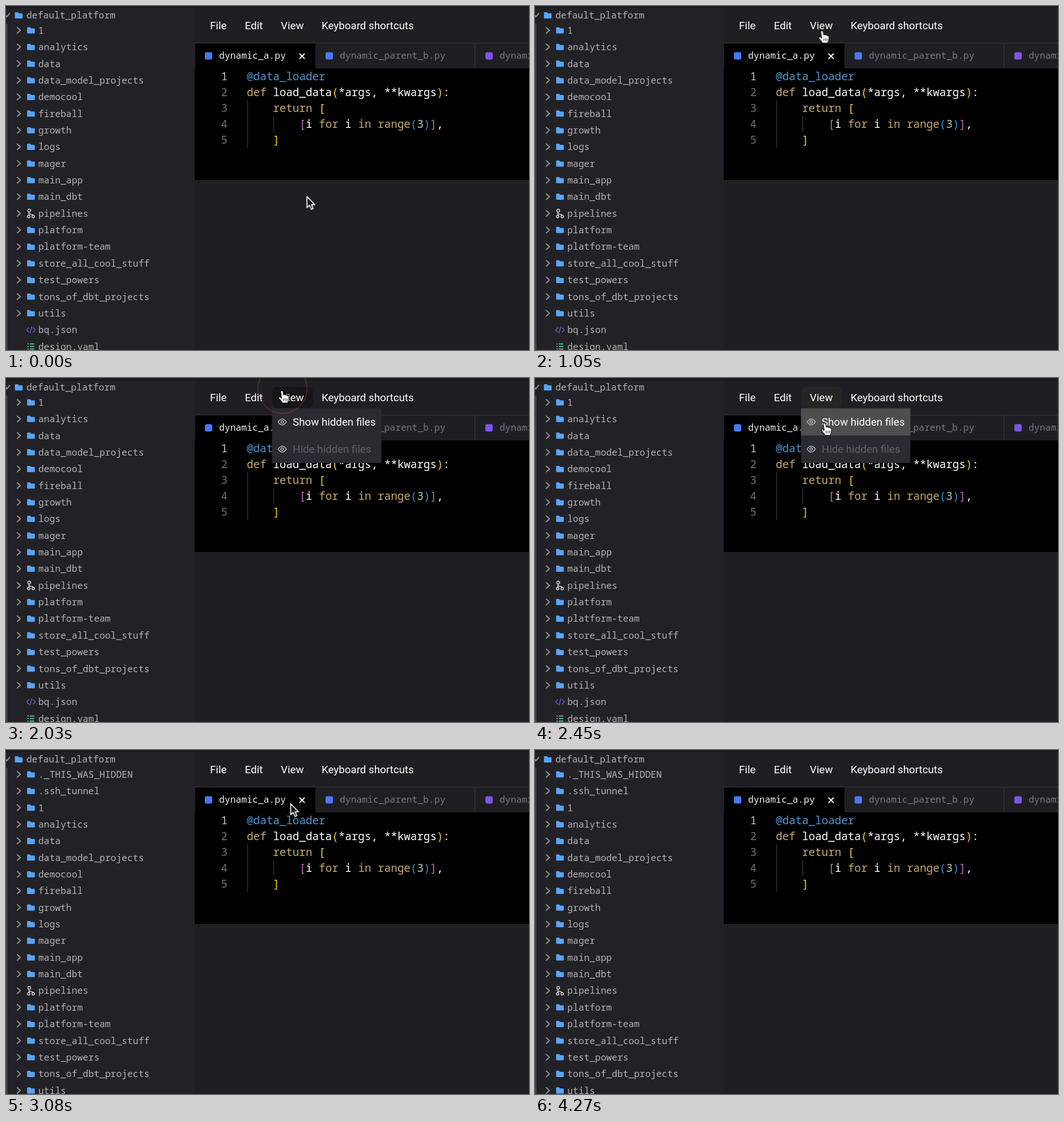
These frames come from a looping animation (923 px wide and 607 px high, 4.34 s). An HTML page:

```html
<!DOCTYPE html>
<html lang="en">
<head>
<meta charset="utf-8">
<title>Show hidden files</title>
<style>
html, body { margin: 0; width: 100%; height: 100%; overflow: hidden; background: #1f1f23; }
svg { display: block; width: 923px; height: 607px; }
text { white-space: pre; }
.mono { font: 16.37px "Noto Sans Mono", monospace; }
.code { font: 19.25px "Noto Sans Mono", monospace; fill: #fff; }
.ui { font: 18.75px Roboto, sans-serif; fill: #fff; }
.tree { fill: #b3b3b7; }
.num { fill: #6f6f74; text-anchor: end; }
.key { fill: #c9aa6c; }
.deco { fill: #4f97d3; }
.b1 { fill: #f7d02c; }
.b2 { fill: #cb66c9; }
.b3 { fill: #2e90e0; }
.lit { fill: #b5cea8; }
.line { fill: none; stroke-linecap: round; stroke-linejoin: round; }

.anim { animation: 4340ms linear infinite; }
.step { animation: 4340ms step-end infinite; }

#cursor { animation-name: travel; }
@keyframes travel {
  0% { transform: translate(530px, 335px); }
  6.45%, 10.48% { transform: translate(571px, 376px); }
  12.9% { transform: translate(571px, 310px); }
  14.52% { transform: translate(571.5px, 235px); }
  17.74% { transform: translate(553px, 125px); }
  22.58% { transform: translate(515px, 55px); }
  27.42% { transform: translate(490px, 20px); }
  30.41% { transform: translate(487px, 8px); }
  33.87% { transform: translate(486.5px, 9.5px); }
  37.1% { transform: translate(487px, 17px); }
  39.52% { transform: translate(487px, 21px); }
  46.77%, 48.39% { transform: translate(487px, 22px); }
  56.45%, 59.68% { transform: translate(511px, 79px); }
  64.52% { transform: translate(507px, 85px); }
  70.97% { transform: translate(501.5px, 93.5px); }
  74.19% { transform: translate(490px, 120px); }
  79.03% { transform: translate(430px, 330px); }
  83.87%, 100% { transform: translate(352px, 630px); }
}
#arrow { animation-name: arrow; }
@keyframes arrow {
  0%, 18.4%, 28.3%, 64.52%, 78.5% { opacity: 1; }
  12.9%, 22.7%, 36.9%, 73%, 83.8%, 100% { opacity: 0; }
}
#beam { animation-name: beam; }
@keyframes beam {
  0%, 18.4%, 78.5%, 100% { opacity: 0; }
  12.9%, 73% { opacity: 1; }
}
#hand { animation-name: hand; }
@keyframes hand {
  0%, 28.3%, 64.52%, 100% { opacity: 0; }
  22.7%, 36.9% { opacity: 1; }
}

.ring { fill: none; stroke: #be464f; animation-name: ring; }
@keyframes ring {
  0% { r: 24px; stroke-width: 8px; opacity: .7; }
  8.06% { r: 45.5px; stroke-width: .2px; opacity: .65; }
  8.07%, 100% { r: 45.5px; stroke-width: 0; opacity: 0; }
}

#menu { animation-name: menu; }
@keyframes menu {
  0%, 64.52%, 100% { opacity: 0; }
  40.32% { opacity: 1; }
}
#view { animation-name: view; }
@keyframes view {
  0%, 64.52%, 100% { fill: #1f1f23; }
  40.32% { fill: #161619; }
  51.6% { fill: #242624; }
}
#pick { animation-name: pick; }
@keyframes pick {
  0%, 64.52%, 100% { opacity: 0; }
  53.2% { opacity: 1; }
}
#hidden { animation-name: reveal; }
@keyframes reveal {
  0%, 100% { opacity: 0; }
  66.13% { opacity: 1; }
}
#files { animation-name: shift; }
@keyframes shift {
  0%, 100% { transform: translateY(0); }
  66.13% { transform: translateY(58.72px); }
}
</style>
</head>
<body>
<svg viewBox="0 0 923 607" xmlns="http://www.w3.org/2000/svg">
  <defs>
    <path id="folder" fill="#58a5fb" d="M38.5-5.5h4l2 2h5q1.3 0 1.3 1.3v6.400q0 1.300-1.300 1.300h-11q-1.300 0-1.300-1.300v-8.400q0-1.300 1.300-1.300z"/>
    <path id="chevron" class="line" stroke="#8d8d92" stroke-width="2" d="M20-5l5.500 5-5.500 5"/>
    <g id="nodes" class="line" stroke="#e4e4e6" stroke-width="1.300">
      <circle cx="41" cy="-5" r="2.600"/><circle cx="40" cy="5.500" r="2.200"/><circle cx="48" cy="5.500" r="2.200"/>
      <path d="M40.500-2.300v5.500M41-.5q0 2 3 2 3 0 3.500 2"/>
    </g>
    <path id="tag" class="line" stroke="#6f55d2" stroke-width="1.500" d="M40-4l-3.500 4 3.500 4M48-4l3.500 4-3.500 4M45.500-5.500l-3 11"/>
    <path id="list" fill="none" stroke="#5fc9a8" stroke-width="1.600" d="M38-4.500h2M42-4.500h8M38 0h2M42 0h8M38 4.500h2M42 4.500h8"/>
    <g id="eye" class="line" stroke="#b4b5b8" stroke-width="1.400">
      <path d="M-7.300 0q7.300-10.500 14.600 0-7.300 10.500-14.600 0z"/><circle r="2.300"/>
    </g>
    <rect id="badge" y="81.500" width="13" height="13" rx="3"/>
    <path id="bar" class="line" d="M-4-9Q0-9 0-6V6Q0 9-4 9M4-9Q0-9 0-6M4 9Q0 9 0 6M-2.500 3H2.500"/>
  </defs>

  <rect width="923" height="607" fill="#1f1f23"/>
  <rect width="333" height="607" fill="#222226"/>
  <rect width="923" height="4" fill="#1b1b1f"/>

  <path d="M1.500 31V607" stroke="#55555a" stroke-width="1.500"/>
  <path class="line" stroke="#8d8d92" stroke-width="2" d="M-3 14l4.500 5 5-6"/>
  <use href="#folder" x="-21.500" y="16.500"/>
  <text class="mono tree" x="36" y="22">default_platform</text>
  <g id="hidden" class="step"></g>
  <g id="files" class="step"></g>

  <!-- editor -->
  <path d="M333 65.500H923M827.500 66V110" stroke="#36363b"/>
  <path d="M334 66H546V110H923V307H333V110H334z" fill="#000"/>
  <g class="mono">
    <use href="#badge" x="351" fill="#4878f6"/>
    <text x="376" y="93" fill="#f2f2f3">dynamic_a.py</text>
    <path class="line" stroke="#fff" stroke-width="2" d="M518.500 84.500l8 8M526.500 84.500l-8 8"/>
    <use href="#badge" x="564" fill="#4878f6"/>
    <text x="589" y="93" fill="#78787d">dynamic_parent_b.py</text>
    <use href="#badge" x="846" fill="#7d55e8"/>
    <text x="871" y="93" fill="#78787d">dynamic_c.py</text>
  </g>
  <path d="M426.500 166V250M472.500 194V222" stroke="#414144"/>
  <g class="code">
    <text class="num" x="391" y="131" style="fill:#c8c8ca">1</text>
    <text class="num" x="391" y="159">2</text>
    <text class="num" x="391" y="187">3</text>
    <text class="num" x="391" y="215">4</text>
    <text class="num" x="391" y="243">5</text>
    <text class="deco" x="425" y="131">@data_loader</text>
    <text x="425" y="159"><tspan class="key">def</tspan> load_data<tspan class="b1">(</tspan>*args, **kwargs<tspan class="b1">)</tspan>:</text>
    <text x="425" y="187">    <tspan class="key">return</tspan> <tspan class="b1">[</tspan></text>
    <text x="425" y="215">        <tspan class="b2">[</tspan>i <tspan class="key">for</tspan> i <tspan class="key">in</tspan> <tspan class="key">range</tspan><tspan class="b3">(</tspan><tspan class="lit">3</tspan><tspan class="b3">)</tspan><tspan class="b2">]</tspan>,</text>
    <text x="425" y="243">    <tspan class="b1">]</tspan></text>
  </g>

  <!-- menu bar -->
  <rect id="view" class="step" x="470" y="16" width="71.500" height="37" rx="8"/>
  <g class="ui">
    <text x="360" y="41">File</text>
    <text x="421.500" y="41">Edit</text>
    <text x="485" y="41">View</text>
    <text x="557" y="41">Keyboard shortcuts</text>
    <g id="menu" class="step">
      <rect x="469.500" y="53.500" width="193" height="96.500" fill="#2a2b30"/>
      <rect id="pick" class="step" x="469.500" y="53.500" width="193" height="48" fill="#4d4f4f"/>
      <use href="#eye" x="487.500" y="77.500"/>
      <text x="506" y="83.500">Show hidden files</text>
      <use href="#eye" x="487.500" y="125.500"/>
      <text x="506" y="131.500" fill="#616266">Hide hidden files</text>
    </g>
  </g>

  <!-- clicks and pointer -->
  <circle class="ring anim" cx="571.500" cy="376" style="animation-delay:-3885ms"/>
  <circle class="ring anim" cx="487.500" cy="6.500" style="animation-delay:-3020ms"/>
  <circle class="ring anim" cx="488" cy="19" style="animation-delay:-2625ms"/>
  <circle class="ring anim" cx="511" cy="79" style="animation-delay:-1700ms"/>
  <g id="cursor" class="anim">
    <path id="arrow" class="step" fill="#141417" stroke="#fff" stroke-width="1.700" stroke-linejoin="round"
      d="M1 1V20.500L5.500 16.500 8.700 23.700 12 22.300 8.900 15.300H14.800z"/>
    <g id="beam" class="step">
      <use href="#bar" stroke="#fff" stroke-width="4.500"/>
      <use href="#bar" stroke="#111" stroke-width="1.500"/>
    </g>
    <g id="hand" class="step" stroke="#16161a" stroke-linejoin="round">
      <path fill="#fff" stroke-width="1.200"
        d="M-2.300 1.800Q-.5-1 1.800 1.500L3 8Q5 6.300 6.500 8.300 8.500 7.200 9.700 9.300 12 9 12.300 11.500L12 16Q11.500 19 10 22H1Q-2 18-5.500 14-6.500 11-3.500 11.200L-.5 13.500z"/>
      <path fill="none" d="M3 14v4.500M6 14v4.500M9 14v4.500"/>
    </g>
  </g>
</svg>
<script>
const ROW = 29.36, TOP = 43;
const icons = { pipelines: 'nodes', 'bq.json': 'tag', 'design.yaml': 'list' };

function row(name, i) {
  const isFile = /\w\.\w/.test(name);
  return `<g transform="translate(0 ${TOP + i * ROW})">
    ${isFile ? '' : '<use href="#chevron"/>'}
    <use href="#${icons[name] || 'folder'}"/>
    <text class="mono tree" x="57" y="5.8">${name}</text></g>`;
}

function fill(id, names) {
  document.getElementById(id).innerHTML = names.split(' ').map(row).join('');
}

fill('hidden', '._THIS_WAS_HIDDEN .ssh_tunnel');
fill('files', '1 analytics data data_model_projects democool fireball growth logs mager ' +
  'main_app main_dbt pipelines platform platform-team store_all_cool_stuff ' +
  'test_powers tons_of_dbt_projects utils bq.json design.yaml');
</script>
</body>
</html>
```
